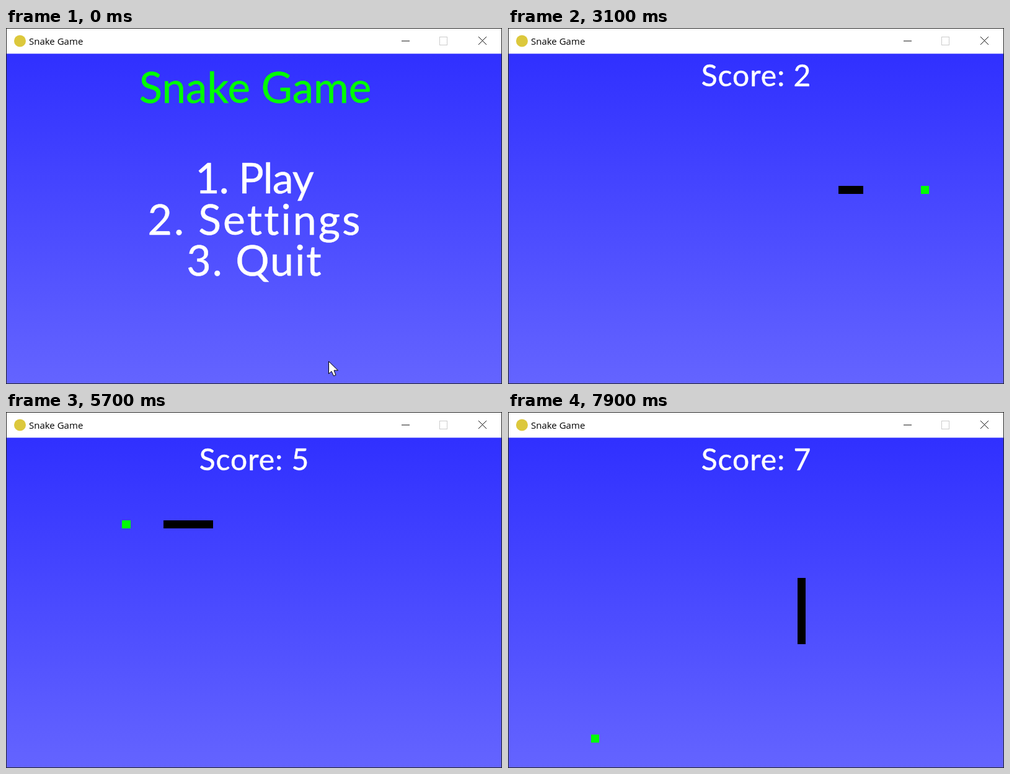
These frames come from a looping animation (800x575 px, 8000 ms). An HTML page with a canvas:

```html
<!DOCTYPE html>
<html lang="en">
<head>
<meta charset="utf-8">
<title>Snake Game</title>
<style>
  html, body { margin: 0; width: 100%; height: 100%; overflow: hidden; background: #fff; }
  canvas { display: block; }
</style>
</head>
<body>
<canvas id="stage" width="800" height="575"></canvas>
<script>
const ctx = document.getElementById('stage').getContext('2d');
const LOOP = 8000, TICK = 100, GAME_START = 500, FIRST_MOVE = 900;
const CELL = 13.3, LEFT = 1, TOP = 42;

// The snake heads for each stop in turn, first up or down, then across.
// Between two timed stops its pace is steady.
const food = (col, row, at) => ({ col, row, at, eaten: true });
const stop = (col, row, at) => ({ col, row, at });
const start = stop(30, 20, FIRST_MOVE);
const route = [
  food(20, 38), stop(22, 33, 2000),
  food(34, 35), stop(42, 16, 3100),
  food(50, 16), stop(51, 16), stop(38, 16, 3800),
  food(35, 13), stop(32, 19), stop(40, 13), stop(38, 19, 4900),
  food(38, 18), food(14, 10), stop(33, 1, 6600),
  food(40, 2), stop(35, 6), stop(35, 24, 7900),
  food(10, 36, 9200)
];
const foods = route.filter(target => target.eaten);

function walk() {
  const trail = [{ ...start, time: 0, score: 0 }];
  let { col, row, at: since } = start;
  let score = 0, pending = [];
  for (const target of route) {
    while (col !== target.col || row !== target.row) {
      if (row !== target.row) row += Math.sign(target.row - row);
      else col += Math.sign(target.col - col);
      pending.push({ col, row, score });
    }
    if (target.eaten) pending[pending.length - 1].score = ++score;
    if (!target.at) continue;
    const pace = (target.at - since) / pending.length;
    pending.forEach((step, i) => trail.push({ ...step, time: since + pace * (i + 1) }));
    since = target.at;
    pending = [];
  }
  return trail;
}

const trail = walk();
const sky = ctx.createLinearGradient(0, 42, 0, 575);
sky.addColorStop(0, '#3030ff');
sky.addColorStop(1, '#6464ff');

function line(x1, y1, x2, y2) {
  ctx.beginPath();
  ctx.moveTo(x1, y1);
  ctx.lineTo(x2, y2);
  ctx.stroke();
}

function lettering(text, x, y, size, color, tracking) {
  ctx.font = `${size}px "Comic Sans MS", Lato, sans-serif`;
  ctx.letterSpacing = `${tracking}px`;
  ctx.textAlign = 'center';
  ctx.lineJoin = 'round';
  ctx.lineWidth = 0.5;
  ctx.fillStyle = ctx.strokeStyle = color;
  ctx.fillText(text, x + tracking / 2, y);
  ctx.strokeText(text, x + tracking / 2, y);
}

function drawWindow() {
  ctx.fillStyle = '#fff';
  ctx.fillRect(0, 0, 800, 42);
  ctx.fillStyle = sky;
  ctx.fillRect(0, 41.5, 800, 533.5);

  ctx.fillStyle = '#dcc83c';
  ctx.beginPath();
  ctx.arc(22.5, 21, 9.5, 0, Math.PI * 2);
  ctx.fill();

  ctx.font = '15px "Open Sans", sans-serif';
  ctx.letterSpacing = '0px';
  ctx.textAlign = 'left';
  ctx.fillStyle = '#000';
  ctx.fillText('Snake Game', 37, 27);

  ctx.lineJoin = 'miter';
  ctx.lineWidth = 1;
  ctx.strokeStyle = '#ccc';
  ctx.strokeRect(699.5, 14.5, 12, 13);
  ctx.strokeStyle = '#111';
  line(638, 21, 651, 21);
  line(762, 14, 775, 27);
  line(775, 14, 762, 27);
  ctx.strokeStyle = '#222';
  ctx.strokeRect(0.5, 0.5, 799, 574);
}

function drawCursor(x, y) {
  const arrow = new Path2D('M0 0V20L4.5 16L8 23.5L11.5 22L8.5 14.5H15Z');
  ctx.save();
  ctx.translate(x, y);
  ctx.fillStyle = '#fff';
  ctx.fill(arrow);
  ctx.lineWidth = 1;
  ctx.strokeStyle = '#000';
  ctx.stroke(arrow);
  ctx.restore();
}

function drawMenu() {
  lettering('Snake Game', 402, 121, 69, '#0f0', 0);
  lettering('1. Play', 401, 267, 68, '#fff', -1);
  lettering('2. Settings', 400, 334, 68, '#fff', 3);
  lettering('3. Quit', 400, 400, 68, '#fff', 2);
  drawCursor(520.5, 538.5);
}

function drawCell({ col, row }, color) {
  const edgeX = c => Math.round(LEFT + c * CELL);
  const edgeY = r => Math.round(TOP + r * CELL);
  const x = edgeX(col), y = edgeY(row);
  ctx.fillStyle = color;
  ctx.fillRect(x, y, edgeX(col + 1) - x, edgeY(row + 1) - y);
}

function drawGame(time) {
  const visited = trail.filter(step => step.time <= time + 0.01);
  const { score } = visited[visited.length - 1];
  lettering(`Score: ${score}`, 400, 94, 48, '#fff', 1);
  drawCell(foods[score], '#0f0');
  visited.slice(-(score + 1)).forEach(step => drawCell(step, '#000'));
}

function frame() {
  const time = Math.floor((performance.now() % LOOP) / TICK) * TICK;
  drawWindow();
  if (time < GAME_START) drawMenu();
  else drawGame(time);
  requestAnimationFrame(frame);
}
frame();
</script>
</body>
</html>
```
